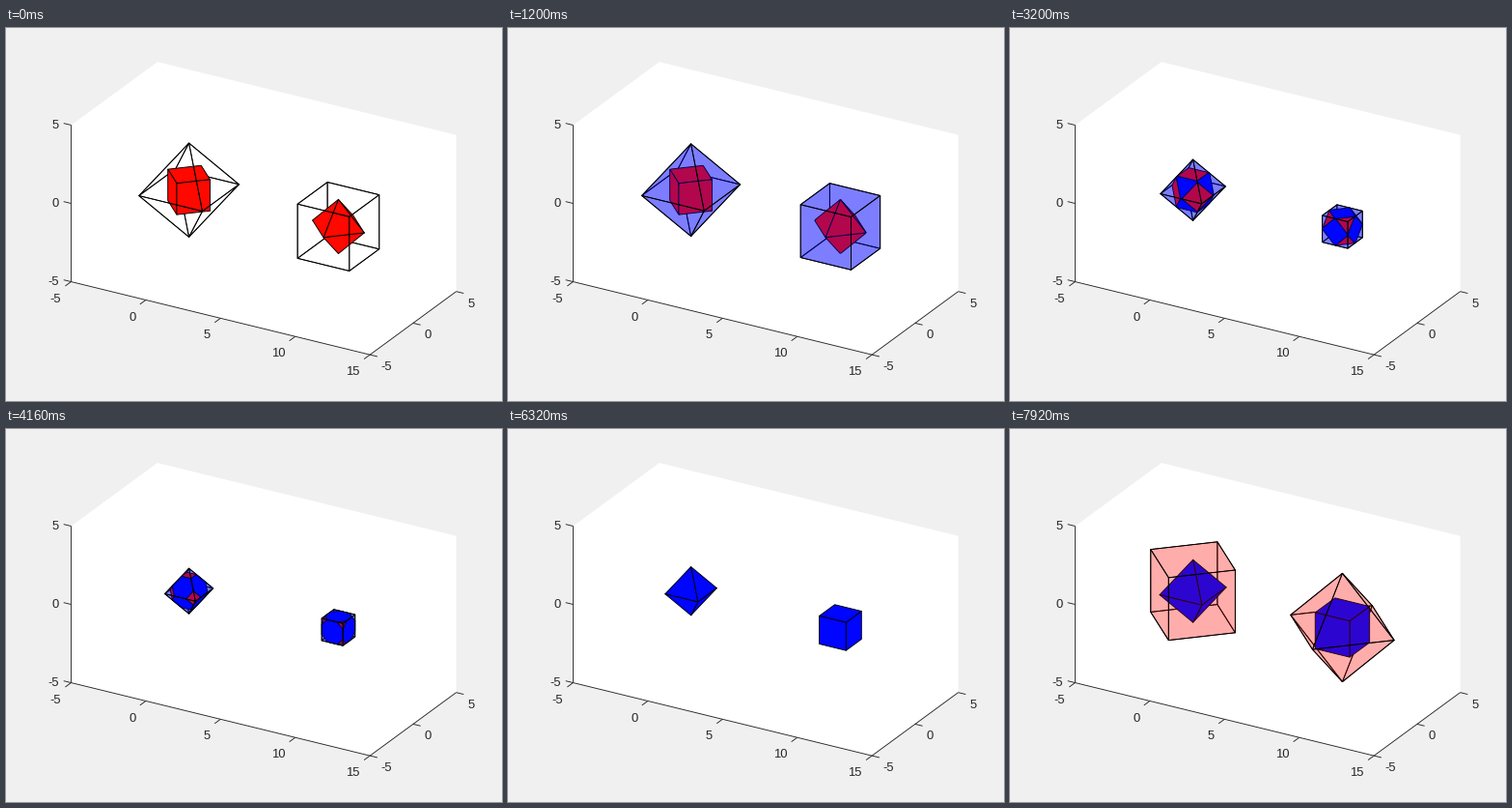
These frames come from a looping animation (514x386 px, 8 s). A matplotlib script:

```python
import itertools
import math

import numpy as np
import matplotlib.pyplot as plt
from matplotlib.animation import FuncAnimation
from matplotlib.collections import PolyCollection

W, H, DPI = 514, 386, 100
PX = 72 / DPI  # one pixel in points
RED, BLUE = (1, 0.03, 0), (0, 0.02, 1)
INK = "#262626"
ROOT3 = math.sqrt(3)

# Orthographic view
SCALE, ORIGIN = 17.88, np.array([189.1, 167.2])
AZ, EL = math.radians(30), math.radians(25)
CA, SA, CE, SE = math.cos(AZ), math.sin(AZ), math.cos(EL), math.sin(EL)
TO_SCREEN = SCALE * np.array([[CA, SA * SE], [SA, -CA * SE], [0, -CE]])
CAMERA = np.array([SA * CE, -CA * CE, SE])

CUBE = np.vstack([np.eye(3), -np.eye(3)])
OCTA = np.array(list(itertools.product((1, -1), repeat=3)), float)


def turn(deg):
    c, s = math.cos(math.radians(deg)), math.sin(math.radians(deg))
    return np.array([[c, s, 0], [-s, c, 0], [0, 0, 1]])


LEFT = (np.zeros(3), turn(45))
RIGHT = (np.array([10.0, 0, 0]), turn(0))


def project(points):
    return ORIGIN + np.asarray(points, float) @ TO_SCREEN


def planes(normals, size, color):
    return [(n, size, color) for n in normals]


def clip(poly, n, c):
    """Keep the part of a polygon where n.p <= c."""
    dist = poly @ n - c
    out = []
    for i in range(len(poly)):
        a, b, da, db = poly[i - 1], poly[i], dist[i - 1], dist[i]
        if (da > 1e-9) != (db > 1e-9):
            out.append(a + (b - a) * da / (da - db))
        if db <= 1e-9:
            out.append(b)
    return np.array(out)


def face(solid, k):
    n, c, _ = solid[k]
    u = np.cross(n, (0.31, 0.57, 0.76))
    u /= np.linalg.norm(u)
    v = np.cross(n, u) / np.linalg.norm(n)
    mid = n * c / (n @ n)
    poly = np.array([mid + 20 * (a * u + b * v)
                     for a, b in ((1, 1), (-1, 1), (-1, -1), (1, -1))])
    for j, (m, d, _) in enumerate(solid):
        if j != k:
            poly = clip(poly, m, d)
            if len(poly) < 3:
                return None
    return poly


def area(p):
    x, y = p.T
    return abs(x @ np.roll(y, 1) - y @ np.roll(x, 1)) / 2


def visible(solid, place, alpha, front):
    """Projected faces turned towards (or away from) the camera."""
    center, rot = place
    out = []
    for k, (n, _, color) in enumerate(solid):
        if ((n @ rot) @ CAMERA > 0) != front:
            continue
        poly = face(solid, k)
        if poly is None:
            continue
        flat = project(poly @ rot + center)
        if area(flat) > 0.05:
            out.append((flat, (*color, alpha)))
    return out


def body(solid, shell, place, alpha):
    faces = visible(solid, place, 1, True)
    if shell:
        faces = (visible(shell, place, alpha, False) + faces
                 + visible(shell, place, alpha, True))
    return faces


def scene(step):
    if step <= 51:  # blue shells fade in, then shrink and cut the red solids
        alpha = 0.03 * min(step, 10)
        r = 3 - 0.05 * max(step - 11, 0)
        h = ROOT3 * np.interp(r, [1, 2, 3], [1 / 3, 1 / 2, 1])
        octa, cube = planes(OCTA, r, BLUE), planes(CUBE, h, BLUE)
        return (body(planes(CUBE, 1, RED) + octa, octa, LEFT, alpha)
                + body(planes(OCTA, ROOT3, RED) + cube, cube, RIGHT, alpha))
    # blue solids grow, then red shells fade in
    r = min(1 + 0.05 * (step - 52), 2)
    shell_l = shell_r = None
    alpha = 0
    if step >= 73:
        alpha = 0.03 * (step - 73)
        shell_l = planes(CUBE, 2, RED)
        shell_r = planes(OCTA, 2 * ROOT3, RED)
    return (body(planes(OCTA, r, BLUE), shell_l, LEFT, alpha)
            + body(planes(CUBE, r / ROOT3, BLUE), shell_r, RIGHT, alpha))


fig = plt.figure(figsize=(W / DPI, H / DPI), dpi=DPI, facecolor="#f0f0f0")
ax = fig.add_axes([0, 0, 1, 1])
ax.set_xlim(-0.5, W - 0.5)
ax.set_ylim(H - 0.5, -0.5)
ax.axis("off")


def line(*points):
    x, y = project(points).T
    ax.plot(x, y, color=INK, lw=0.9 * PX, solid_capstyle="butt", zorder=2)


def label(x, y, value, ha):
    ax.text(x, y + 4.6, str(value), ha=ha, va="baseline", color=INK,
            family="Liberation Sans", size=13 * PX, zorder=2)


def draw_box():
    outline = [(-5, -5, -5), (15, -5, -5), (15, 5, -5),
               (15, 5, 5), (-5, 5, 5), (-5, -5, 5)]
    ax.fill(*project(outline).T, color="white", lw=0, zorder=1)
    line((-5, -5, 5), (-5, -5, -5), (15, -5, -5), (15, 5, -5))
    for v in range(-5, 16, 5):
        line((v, -5, -5), (v, -5.68, -5))
        x, y = project((v, -5, -5))
        label(x - 10.5, y + 16.5, v, "right")
    for v in (-5, 0, 5):
        line((15, v, -5), (15.5, v, -5))
        x, y = project((15, v, -5))
        label(x + 11.5, y + 11.5, v, "left")
        line((-5, -5, v), (-5.5, -5, v))
        x, y = project((-5, -5, v))
        label(x - 12.5, y - 1, v, "right")
    ax.plot([-0.5, W], [H - 1, H - 1], color="#a0a0a0", lw=PX)


draw_box()
shapes = PolyCollection([], edgecolors="black", linewidths=0.9 * PX,
                        joinstyle="round", zorder=3)
ax.add_collection(shapes, autolim=False)


def update(i):
    # every fifth tick holds the picture
    faces = scene(i - (i + 2) // 5)
    shapes.set_verts([p for p, _ in faces])
    shapes.set_facecolor([c for _, c in faces])
    return (shapes,)


anim = FuncAnimation(fig, update, frames=100, interval=80,
                     init_func=lambda: update(0), repeat=True, repeat_delay=0)
plt.show()
```
